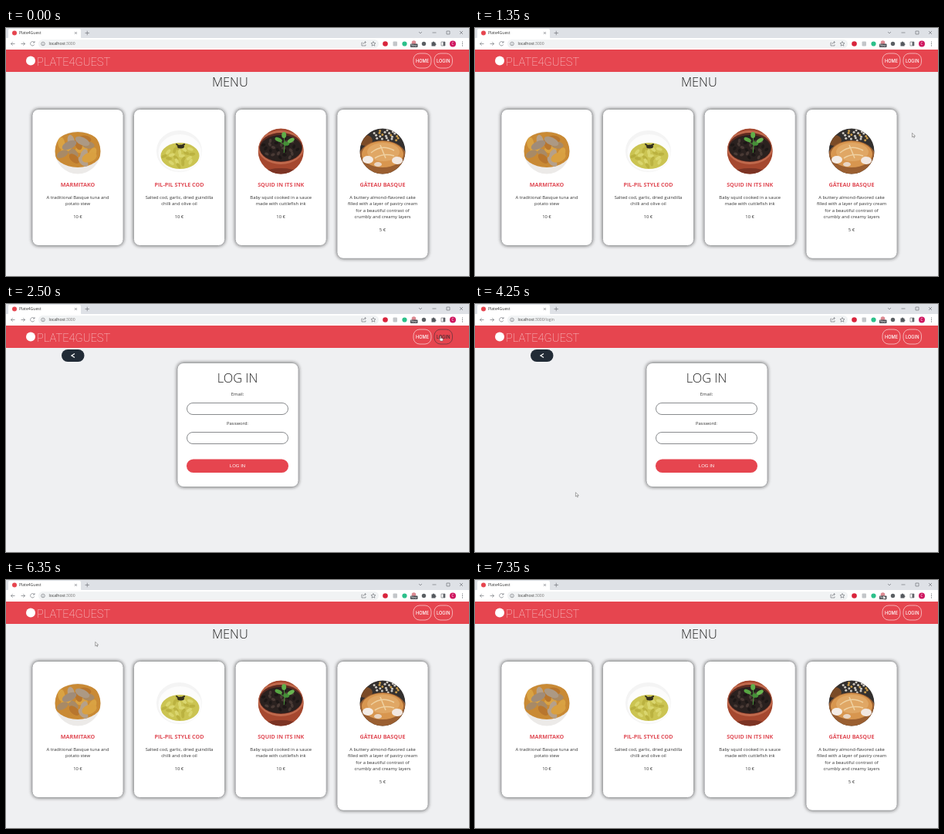
Write an HTML page that moves like this. It is 600 by 322 pixels and loops after 7.4 s.

```html
<!DOCTYPE html>
<html lang="en">
<head>
<meta charset="utf-8">
<title>Plate4Guest</title>
<style>
html, body { margin: 0; width: 100%; height: 100%; overflow: hidden; background: #eff0f2; }
svg { display: block; width: 100vw; height: 100vh; }
text { font-family: "Open Sans", "Noto Sans", sans-serif; font-size: 5.85px; fill: #333; }
.mid { text-anchor: middle; }
.head { font-weight: 300; font-size: 16.4px; fill: #222; }
.dish { font-weight: 700; font-size: 7.2px; fill: #e04c56; }
.btn { font-family: "Liberation Sans", Arial, sans-serif; font-size: 6px; fill: #fff; }
.nav text { font-family: Inter, sans-serif; font-weight: 500; font-size: 5.7px; }
.logo { font-family: Roboto, sans-serif; font-weight: 200; font-size: 14.7px; fill: #fbdfe1; }
.bar { font-size: 5.05px; }
.card { fill: #fff; stroke: #a3a4a6; stroke-width: .9; filter: url(#shade); }
.field { fill: #fff; stroke: #7c7e82; stroke-width: .9; }
.nav rect { fill: none; stroke: #fbdadc; stroke-width: .7; }
.nav.hover rect { stroke: #59333a; }
.nav.hover text { fill: #40272d; }
.icon { fill: none; stroke: #6b6f74; stroke-width: .65; }
</style>
</head>
<body>
<svg viewBox="0 0 600 322" preserveAspectRatio="none">
  <defs>
    <filter id="shade" x="-10%" y="-10%" width="120%" height="120%">
      <feDropShadow dx="0" dy="0" stdDeviation="1.9" flood-color="#222" flood-opacity=".7"/>
    </filter>
    <clipPath id="round"><circle r="29.5"/></clipPath>
  </defs>

  <rect width="600" height="322" fill="#eff0f2"/>
  <rect width="600" height="14" fill="#dee1e6"/>
  <path d="M1 14q2 0 2-2V3q0-2 2-2h90q2 0 2 2v9q0 2 2 2z" fill="#fff"/>
  <rect y="13" width="600" height="15" fill="#fff"/>
  <circle cx="11" cy="6.5" r="3" fill="#e6454f"/>
  <text class="bar" x="17" y="8.3">Plate4Guest</text>
  <path class="icon" d="M89 5l3 3m0-3l-3 3M102.500 6.500h5.500m-2.750-2.750v5.500M535 5l2 2 2-2M552.500 6h5M571 4h4v4h-4zM588 4l4 4m0-4l-4 4"/>
  <path class="icon" d="M11.500 20.500H6.500m2.200-2.200l-2.200 2.200 2.200 2.200M19.500 20.500h5m-2.200-2.200l2.200 2.200-2.200 2.200M36.500 18.700a2.700 2.700 0 1 0 .3 2.700M37 17v2h-2"/>
  <rect x="42" y="15" width="441" height="11" rx="5.500" fill="#f1f3f4"/>
  <g class="icon">
    <circle cx="48" cy="20.500" r="2.300"/>
    <path d="M48 20v1.500M462 19h-1v4h5v-1.500M463 21q0-2.500 3-2.500m-1-1.500l1.500 1.500L465 20"/>
    <path d="M476 17.500l.9 2 2.100.2-1.600 1.400.5 2.100-1.900-1.100-1.900 1.100.5-2.100-1.600-1.400 2.100-.2z"/>
    <path d="M564 18h5v5h-5z"/>
  </g>
  <text class="bar" x="55.500" y="22.300">localhost<tspan fill="#777">:3000<tspan id="path"></tspan></tspan></text>
  <circle cx="491.500" cy="20.500" r="3.300" fill="#d9243c"/>
  <rect x="501.500" y="17.500" width="5.500" height="6" rx="1" fill="#c3c6c9"/>
  <circle cx="516.500" cy="20.500" r="3.100" fill="#2bc08a"/>
  <circle cx="528.500" cy="19" r="2.800" fill="#dc8a92"/>
  <rect x="524" y="20.500" width="9.500" height="4.500" rx=".8" fill="#4b4f54"/>
  <text class="mid" x="528.700" y="24.100" style="font-size:3.600px;fill:#fff">New</text>
  <circle cx="541.500" cy="20.500" r="2.700" fill="#5b5f63"/>
  <path d="M551.500 18.500h1.500a1 1 0 0 1 2 0h1.500v1.700a1 1 0 0 1 0 2V23.500h-5z" fill="#55595e"/>
  <path d="M566.500 18h2.500v5h-2.500z" fill="#5f6368"/>
  <circle cx="579" cy="20.500" r="4" fill="#cf1760"/>
  <text class="mid" x="579" y="22.100" style="font-size:4.500px;fill:#fff">C</text>
  <path d="M591.500 18v.1m0 2.300v.1m0 2.300v.1" stroke="#5f6368" stroke-width="1.100" stroke-linecap="round"/>

  <rect y="28" width="600" height="29" fill="#e6454f"/>
  <circle cx="32" cy="42.500" r="6" fill="#fff"/>
  <text class="logo" x="40" y="48.600">PLATE4GUEST</text>
  <g class="nav"><rect x="528" y="33" width="23" height="19" rx="8"/><text class="btn mid" x="539.500" y="44.600">HOME</text></g>
  <g class="nav" id="login"><rect x="555" y="33" width="23.500" height="19" rx="8"/><text class="btn mid" x="566.700" y="44.600">LOGIN</text></g>

  <g id="menu"><text class="head mid" x="290.300" y="76">MENU</text></g>

  <g id="form">
    <rect x="72" y="59" width="29.500" height="16" rx="8" fill="#212b36"/>
    <path d="M89 64.500l-4 2.500 4 2.500" fill="none" stroke="#fff" stroke-width="1.300"/>
    <rect class="card" x="222" y="76.500" width="157" height="161" rx="8"/>
    <text class="head mid" x="300" y="101.500">LOG IN</text>
    <text class="mid" x="300" y="119">Email:</text>
    <rect class="field" x="234.500" y="128.500" width="131" height="15" rx="7.500"/>
    <text class="mid" x="300" y="157">Password:</text>
    <rect class="field" x="234.500" y="166.500" width="131" height="15" rx="7.500"/>
    <rect x="234" y="201.500" width="132" height="17.500" rx="8.700" fill="#e6454f"/>
    <text class="btn mid" x="300" y="212.300">LOG IN</text>
  </g>

  <g id="cursor" stroke="#555" stroke-width=".5" fill="#fff">
    <path id="arrow" d="M0 0v5.300l1.300-1.200.9 2 .9-.4-.9-1.900H4z"/>
    <path id="hand" d="M-.5 0q.6-.7 1.200 0v2.300l2.200.6q.6.300.5 1L3 6H0L-1.800 3.500q.2-.7 1.300.2z"/>
  </g>
</svg>
<script>
const $ = id => document.getElementById(id);
const oval = (x, y, rx, ry, fill, turn = 0) =>
  `<ellipse cx="${x}" cy="${y}" rx="${rx}" ry="${ry}" fill="${fill}" transform="rotate(${turn} ${x} ${y})"/>`;
const scatter = (n, draw) => Array.from({ length: n }, (_, i) => {
  const a = i * 2.4, r = Math.sqrt((i + .5) / n);
  return draw(Math.cos(a) * r, Math.sin(a) * r, i);
}).join("");

const stew = oval(0, 2, 31, 28, "#eceae8") + oval(0, -2, 32, 23, "#c98a35") +
  scatter(13, (x, y, i) => oval(x * 25, y * 17 - 2, 8, 4.5, ["#d9a243", "#a88a66", "#b8762e", "#b5a08a"][i % 4], i * 37)) +
  oval(-11, -8, 10, 5, "#a08c79", -25) + oval(6, -13, 10, 5, "#ac9984", 25) +
  oval(15, 8, 10, 6, "#d9a041", -20);

const cod = oval(0, 0, 30, 27, "#f4f4f4") + oval(1, 2, 28, 24, "#fcfcfc") +
  oval(1, 6, 25, 17, "#cbc452") +
  scatter(20, (x, y, i) => oval(x * 21, y * 13 + 6, 4, 2, ["#dad66e", "#bbb240"][i % 2], i * 41)) +
  oval(2, -6, 4.5, 2.5, "#34301f") + oval(5, -8, 3, 1.2, "#34301f", -30) + oval(-2, -8, 3, 1, "#34301f", 35);

const squid = oval(0, 0, 30, 30, "#a5482f") + oval(0, -5, 30, 22, "#c0694c") +
  oval(0, -5, 28, 19, "#5d2a20") + oval(0, -4, 27, 17, "#2a211f") +
  scatter(26, (x, y, i) => oval(x * 24, y * 14 - 4, 2.8, 1.8, ["#493a35", "#1c1716"][i % 2], i * 50)) +
  oval(0, 27, 20, 5, "#7c3424") +
  '<path d="M4 2Q6-10 4-22M5-8l-8-6M5-7l9-6" fill="none" stroke="#4c9a3d"/>' +
  oval(4, -21, 3, 4, "#5fae49") + oval(-3, -15, 5, 2.5, "#57a543", 25) +
  oval(13, -14, 5, 2.5, "#68b550", -30) + oval(7, -10, 4, 2.5, "#458f38", 20);

const cake = oval(0, 0, 30, 30, "#33302f") + oval(-22, -14, 9, 7, "#7b4b27") +
  scatter(26, (x, y, i) => oval(x * 20 + 8, y * 8 - 21, 1.5, 1.5, i % 4 ? "#cfcac2" : "#c99b4a")) +
  oval(0, 8, 31, 22, "#9a5f31") + oval(0, 4, 27, 17, "#d8964f") + oval(1, 1, 21, 12, "#e0a765") +
  '<path d="M-15 2q14-12 30-3M-10 9q11-7 25-3M-3-8l7 17" fill="none" stroke="#efd1a1" stroke-width="1.500"/>' +
  oval(-19, 11, 7, 5, "#f4ece6") + oval(19, 12, 7, 5, "#f2e8e1") + oval(-6, 17, 5, 3, "#e9d5c3");

const dishes = [
  [93, "MARMITAKO", ["A traditional Basque tuna and", "potato stew"], 10, stew],
  [224.5, "PIL-PIL STYLE COD", ["Salted cod, garlic, dried guindilla", "chilli and olive oil"], 10, cod],
  [356.2, "SQUID IN ITS INK", ["Baby squid cooked in a sauce", "made with cuttlefish ink"], 10, squid],
  [488, "GÂTEAU BASQUE", ["A buttery almond-flavored cake", "filled with a layer of pastry cream", "for a beautiful contrast of", "crumbly and creamy layers"], 5, cake]
];
$("menu").innerHTML += dishes.map(([x, name, lines, price, photo]) => {
  const row = (s, y, cls = "") => `<text class="mid ${cls}" x="${x}" y="${y}">${s}</text>`;
  const extra = (lines.length - 2) * 8.4;
  return `<rect class="card" x="${x - 59}" y="105.500" width="118" height="${177 + extra}" rx="8"/>
    <g transform="translate(${x} 160)" clip-path="url(#round)">${photo}</g>` +
    row(name, 206, "dish") + lines.map((s, i) => row(s, 222 + i * 8.4)).join("") +
    row(price + " €", 247 + extra);
}).join("");

// Pointer stops: time, x, y
const stops = [
  [250, -8, 290], [800, 93, 81], [1000, 190, 115], [1350, 566.5, 136.5], [1700, 570, 105],
  [1950, 563, 42], [3200, 563, 42], [3600, 420, 170], [3900, 200, 270], [4250, 130.5, 245],
  [4700, 95, 110], [5000, 86, 68], [6200, 86, 68], [6350, 115, 80], [6650, 330, 200],
  [6950, 500, 280], [7350, 529, 20]
];
function pointer(t) {
  if (t <= stops[0][0]) return stops[0].slice(1);
  const i = stops.findIndex(s => s[0] > t);
  if (i < 0) return stops.at(-1).slice(1);
  const [t0, x0, y0] = stops[i - 1], [t1, x1, y1] = stops[i];
  const k = (t - t0) / (t1 - t0);
  return [x0 + (x1 - x0) * k, y0 + (y1 - y0) * k];
}
const show = (id, on) => $(id).style.display = on ? "" : "none";

function draw(now) {
  const t = now % 7400, [x, y] = pointer(t);
  const form = t >= 2500 && t < 5900;
  const onLogin = x > 555 && x < 579 && y > 33 && y < 52;
  const onBack = form && x > 72 && x < 102 && y > 59 && y < 75;
  show("menu", !form);
  show("form", form);
  $("path").textContent = t >= 2550 && t < 5900 ? "/login" : "";
  $("login").classList.toggle("hover", onLogin);
  show("hand", onLogin || onBack);
  show("arrow", !(onLogin || onBack));
  $("cursor").setAttribute("transform", `translate(${x} ${y})`);
}
const start = performance.now();
function tick() {
  draw(performance.now() - start);
  requestAnimationFrame(tick);
}
tick();
</script>
</body>
</html>
```
